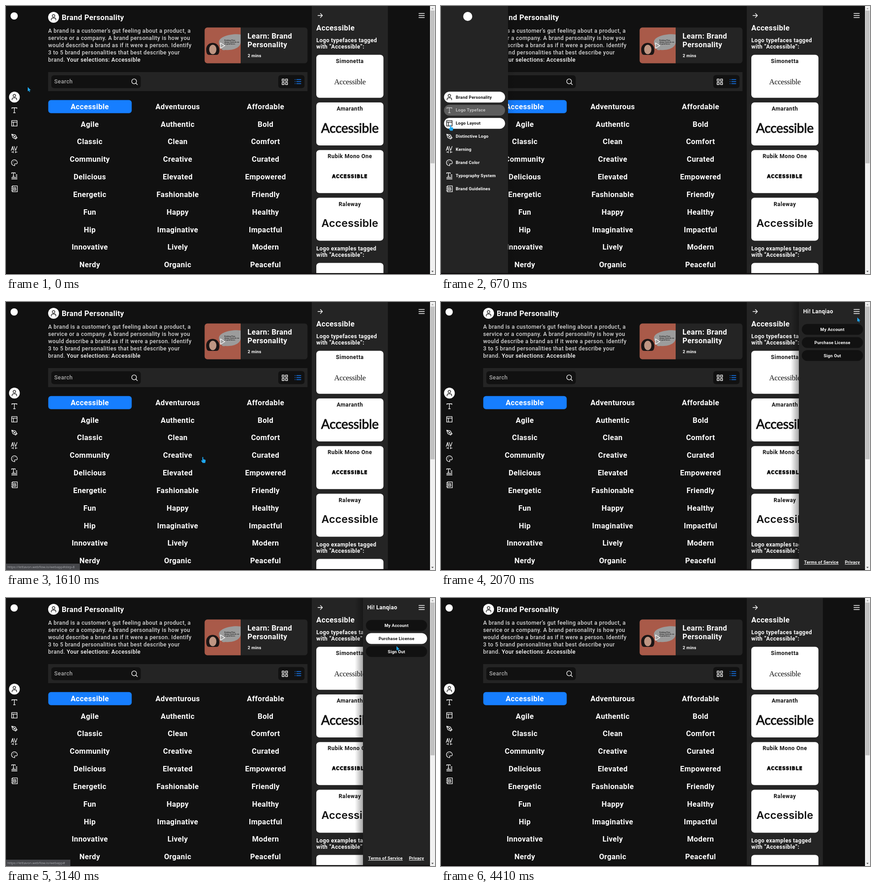
These frames come from a looping animation (947 px wide and 592 px high, 4480 ms). An HTML page:

```html
<!DOCTYPE html>
<html lang="en">
<head>
<meta charset="utf-8">
<title>Brand Personality</title>
<style>
html, body { margin: 0; width: 100%; height: 100%; overflow: hidden; background: #111; }
svg { display: block; width: 947px; height: 592px; }
text { font-family: Roboto, "Noto Sans", sans-serif; fill: #fff; white-space: pre; }
.big { font-size: 16.4px; font-weight: 700; letter-spacing: .4px; }
.mid { font-size: 12.3px; font-weight: 700; letter-spacing: .36px; }
.body { font-size: 12.4px; font-weight: 500; letter-spacing: .39px; fill: #d6d6d6; }
.small { font-size: 9.5px; font-weight: 700; letter-spacing: .22px; }
.tiny { font-size: 3.8px; font-weight: 700; fill: #222; }
.url { font: 7.4px "Open Sans", "Noto Sans", sans-serif; fill: #a9abb0; }
.c { text-anchor: middle; }
.dark { fill: #111; }
.line { fill: none; stroke: #fff; stroke-width: 1.3; stroke-linejoin: round; stroke-linecap: round; }
</style>
</head>
<body>
<svg id="stage" viewBox="0 0 947 592" xmlns="http://www.w3.org/2000/svg"></svg>
<script>
const LOOP = 4480, TICK = LOOP / 67;
const BLUE = '#167eff', PANEL = '#242424', BG = '#111';

const text = (x, y, s, cls, extra = '') => `<text x="${x}" y="${y}" class="${cls}" ${extra}>${s}</text>`;
const box = (x, y, w, h, fill, r = 0, extra = '') =>
  `<rect x="${x}" y="${y}" width="${w}" height="${h}" rx="${r}" fill="${fill}" ${extra}/>`;
const line = (d, extra = '') => `<path class="line" d="${d}" ${extra}/>`;
const lines = (x, y, step, rows, cls) => rows.map((s, i) => text(x, y + i * step, s, cls)).join('');

// Icons are drawn around 0,0
const USER = 'M-2.9-3.2a2.9 2.9 0 1 0 5.8 0a2.9 2.9 0 1 0-5.8 0M-5 6V4.5a3 3 0 0 1 3-3H2a3 3 0 0 1 3 3V6';
const NAV = [
  ['Brand Personality', USER],
  ['Logo Typeface', 'M-5.5-3.7V-5.5H5.5V-3.7M0-5.5V5.5M-2 5.5H2'],
  ['Logo Layout', 'M-6-6H6V6H-6ZM-6-2.5H6M-2-2.5V6'],
  ['Distinctive Logo', 'M-6-5L2-3.5L5 1.5L1 4.8L-3.5 2.5ZM-6-5L-.5-.3M-.5.5a1 1 0 1 0 2 0a1 1 0 1 0-2 0M2.2 6L6.3 2.5'],
  ['Kerning', 'M-7 2L-4-7L-1 2M-6-1H-2M-.5-7L2.8 2L6-7M-6 5.5H-2.5M2.5 5.5H6M-2.5 3.8V7.2M2.5 3.8V7.2'],
  ['Brand Color', 'M1 6.5A6.5 6.5 0 1 1 6.5 0C6.5 2 5 3 3 2.5C0 2 0 4 1 6.5ZM-3 .5h.1M-2.2-2.8h.1M1.5-3.5h.1'],
  ['Typography System', 'M-6-5V-6.5H2V-5M-2-6.5V1.5M-3.5 1.5H-.5M3.5-2H6M3.5 1H6M-6 4H6M-6 7H6'],
  ['Brand Guidelines', 'M-4.5-6.5H6.5V6.5H-4.5ZM-6.5-4h3M-6.5 0h3M-6.5 4h3M-1.3-3.5V3.5H1.5a1.8 1.8 0 0 0 0-3.6H-1.3M1.3-.1a1.7 1.7 0 0 0 0-3.4H-1.3']
];
const TRAITS = ('Accessible Adventurous Affordable Agile Authentic Bold Classic Clean Comfort Community ' +
  'Creative Curated Delicious Elevated Empowered Energetic Fashionable Friendly Fun Happy Healthy ' +
  'Hip Imaginative Impactful Innovative Lively Modern Nerdy Organic Peaceful').split(' ');
const CARDS = [
  ['Simonetta', 'Accessible', 172.5, "font:17px 'Liberation Serif',serif;letter-spacing:-.4px"],
  ['Amaranth', 'Accessible', 175, 'font:28.5px Lato,sans-serif;letter-spacing:-.3px;stroke:#111;stroke-width:.9px'],
  ['Rubik Mono One', 'ACCESSIBLE', 169.5, "font:700 10px 'DejaVu Sans',sans-serif;letter-spacing:1.1px;stroke:#111;stroke-width:.9px"],
  ['Raleway', 'Accessible', 172.5, 'font:600 23.5px Inter,sans-serif;letter-spacing:.1px']
];
const ACCOUNT = ['My Account', 'Purchase License', 'Sign Out'];
const navY = i => 201.3 + i * 28.95;
const pillY = i => 60.5 + i * 28.9;

const header =
  `<circle cx="105" cy="25" r="12" fill="#fff"/>` + line(USER, `transform="translate(105 25)" style="stroke:${BG}"`) +
  text(123, 30.5, 'Brand Personality', 'big') +
  lines(93, 59, 15.9, [
    'A brand is a customer’s gut feeling about a product, a',
    'service or a company. A brand personality is how you',
    'would describe a brand as if it were a person. Identify',
    '3 to 5 brand personalities that best describe your',
    'brand. <tspan fill="#fff">Your selections: Accessible</tspan>'
  ], 'body');

const lesson =
  box(438.5, 47.4, 227, 79, PANEL, 6) +
  `<path d="M518 47.400V126.400H444.500a6 6 0 0 1-6-6V53.400a6 6 0 0 1 6-6Z" fill="#a95a49"/>
   <path d="M471 90L478 97Q480 98 484 97C505 99 518 90 518 80V63C502 60 470 66 470 80Q470 86 474 89Z" fill="#9c9c9c"/>
   <path d="M442 98C440 76 472 76 471 98Q471 108 464 108H449Q442 108 442 98Z" fill="#1b1515"/>
   <ellipse cx="456.500" cy="96" rx="8" ry="10.500" fill="#bf9683"/>` +
  lines(482, 76.5, 4.3, ['Drinking Plem', 'always reminds me', 'of good times'], 'tiny') +
  line('M473.500 81.500L483 87.500L473.500 93.500Z') +
  lines(533, 72, 19, ['Learn: Brand', 'Personality'], 'big') +
  text(533.5, 113, '2 mins', 'small');

const tools =
  box(93, 146, 572.5, 42, PANEL) + box(100, 153, 197.5, 28.5, BG, 6) + box(601, 152.5, 58, 29, BG, 6) +
  text(106.5, 171.3, 'Search', 'body', 'style="fill:#aaa"') +
  line('M277.500 166.500a5.300 5.300 0 1 0 10.600 0a5.300 5.300 0 1 0-10.600 0M286.700 170.500L290 173.800') +
  line('M609.500 161.500h4.500v4.500h-4.500ZM617 161.500h4.500v4.500h-4.500ZM609.500 169h4.500v4.500h-4.500ZM617 169h4.500v4.500h-4.500Z') +
  line('M638 162.500h.5M641.500 162.500h9.500M638 167h.5M641.500 167h9.500M638 171.500h.5M641.500 171.500h9.500', `style="stroke:${BLUE}"`);

const traits = box(93.3, 207.8, 184.2, 29, BLUE, 6) + TRAITS.map((s, i) =>
  text(185 + i % 3 * 194, 227.8 + Math.floor(i / 3) * 38.83, s, 'big c')).join('');

const examples =
  box(675, 0, 168, 592, PANEL) + line('M688.500 21H698.500M694 16.500L698.500 21L694 25.500') +
  text(685, 54, 'Accessible', 'big') +
  lines(685, 79.5, 14, ['Logo typefaces tagged', 'with “Accessible”:'], 'mid') +
  CARDS.map(([name, word, y, style], i) => `<g transform="translate(0 ${i * 105.2})">` +
    box(685, 107.8, 148.2, 95, '#fff', 7) + text(759, 126, name, 'mid c dark', 'style="font-weight:600;letter-spacing:.5px"') +
    text(759, y, word, 'c dark', `style="${style}"`) + '</g>').join('') +
  lines(685, 539.5, 14, ['Logo examples tagged', 'with “Accessible”:'], 'mid') +
  box(685, 567.5, 148.2, 40, '#fff', 7);

const menu =
  `<g id="sheet">${box(0, 0, 37, 592, PANEL, 0, 'id="sheetBg"')}${box(0, 0, 18, 592, 'url(#fadeR)', 0, 'id="sheetShade"')}</g>` +
  `<circle id="mark" fill="#fff"/>` +
  NAV.map(([, d], i) => box(6.7, navY(i) - 12, 24, 24, '#fff', 12, 'class="navPill"') +
    line(d, `transform="translate(18.500 ${navY(i)})"  data-nav="${i}"`)).join('') +
  `<g id="labels" clip-path="url(#menuClip)">` +
  NAV.map(([s], i) => text(32.5, navY(i) + 3.2, s, 'small')).join('') + '</g>';

const account = `<g id="account">` + box(770, 0, 18, 592, 'url(#fadeL)') + box(788, 0, 148, 592, PANEL) +
  text(797.5, 25, 'Hi! Lanqiao', 'mid') +
  ACCOUNT.map((s, i) => box(794.5, pillY(i) - 12, 135, 24, BG, 12, 'class="accPill"') +
    text(862, pillY(i) + 3.2, s, 'small c accText')).join('') +
  text(799.5, 578, 'Terms of Service', 'small', 'text-decoration="underline"') +
  text(889.5, 578, 'Privacy', 'small', 'text-decoration="underline"') + '</g>';

const scrollbar = box(936, 0, 11, 592, '#f1f1f1') + box(937, 10, 9, 337.5, '#c1c1c1') +
  `<path d="M939 7L941.500 4L944 7Z" fill="#a3a3a3"/><path d="M939 585L941.500 588L944 585Z" fill="#505050"/>`;

const fade = (id, a, b, peak) => `<linearGradient id="${id}"><stop stop-opacity="${a * peak}"/><stop offset="1" stop-opacity="${b * peak}"/></linearGradient>`;

const stage = document.getElementById('stage');
stage.innerHTML =
  `<defs>${fade('fadeR', 1, 0, .1)}${fade('fadeL', 0, 1, .35)}<clipPath id="menuClip"><rect id="clipBox" height="592"/></clipPath></defs>` +
  box(0, 0, 947, 592, BG) + header + lesson + tools + traits + examples + menu + account +
  line('M911.500 16.500H923.500M911.500 21H923.500M911.500 25.500H923.500', 'style="stroke-width:1.6"') +
  box(0, 590, 936, 2, '#090607') + scrollbar +
  `<g id="status">${box(0, 578, 163, 14, '#45464a', 0, 'id="statusBg"')}${text(3, 588, '', 'url')}</g>` +
  `<g id="cursor" fill="#1ea7f0"><path id="arrow" d="M0 0V9.500L2.200 7.700L3.800 11L5.200 10.300L3.700 7.100H6.800Z"/>
   <path id="hand" d="M-1 .5Q0-.8 1 .5V4.800L5 5.800Q6.500 6.300 6.300 8L5.300 13H-.3L-3.500 8.500Q-3.500 7 -2 7.300L-1 8.300Z"/></g>`;

const $ = id => document.getElementById(id);
const all = q => [...stage.querySelectorAll(q)];
const set = (el, attrs) => { for (const k in attrs) el.setAttribute(k, attrs[k]); };
const show = (el, on) => { el.style.display = on ? '' : 'none'; };
const clamp = v => Math.min(1, Math.max(0, v));
const navPills = all('.navPill'), navIcons = all('[data-nav]'), labels = all('#labels text');
const accPills = all('.accPill'), accTexts = all('.accText'), urlText = all('.url')[0];

// The CSS "ease" curve, solved by bisection
function ease(p) {
  p = clamp(p);
  if (p === 0 || p === 1) return p;
  let lo = 0, hi = 1, u;
  for (let i = 0; i < 20; i++) {
    u = (lo + hi) / 2;
    const x = .75 * u * (1 - u) + u ** 3;
    if (x < p) lo = u; else hi = u;
  }
  return .3 * u * (1 - u) ** 2 + 3 * u * u * (1 - u) + u ** 3;
}
const opened = (t, from, to) => ease((t - from) / 200) - ease((t - to) / 200);

// Quick rise while hovered, then an exponential trail
const hover = (t, from, to) => t < from ? 0 : t <= to ? clamp((t - from) / 50) : Math.exp((to - t) / 47);
const gray = v => `rgb(${v},${v},${v})`;
const mix = (a, b, k) => gray(Math.round(a + (b - a) * k));

const PATH = [
  [0, 48, 179], [70, 40, 179], [140, 22, 180], [200, 13, 181], [400, 16, 198], [540, 18, 222],
  [740, 22, 285], [940, 27, 384], [1000, 28, 403], [1140, 28, 403], [1270, 150, 390], [1420, 330, 362],
  [1600, 434, 343], [1670, 440, 335], [1780, 660, 190], [1900, 890, 48], [2070, 919, 34], [2210, 916, 36],
  [2400, 880, 49], [2540, 866, 58], [2680, 861, 60], [2810, 861, 82], [3080, 861, 82], [3140, 862, 106],
  [3270, 862, 113], [3410, 862, 119], [4140, 862, 119], [4340, 880, -20]
];
const HANDS = [[530, 1700], [2480, 3100], [3190, 4200]];
const URLS = [[1065, 1800, '#step-8', 163], [2540, 4300, '#', 142]];
const ACC_HOVER = [[2480, 2740], [2740, 3180], [3180, 4200]];
const during = (t, rows) => rows.find(r => t >= r[0] && t < r[1]);

function cursorAt(t) {
  const i = PATH.findIndex(p => p[0] > t);
  if (i < 0) return PATH[PATH.length - 1].slice(1);
  const [t0, x0, y0] = PATH[i - 1], [t1, x1, y1] = PATH[i], k = (t - t0) / (t1 - t0);
  return [x0 + (x1 - x0) * k, y0 + (y1 - y0) * k];
}

function draw(t) {
  const k = opened(t, 60, 1270), w = 37 + 111 * k;
  set($('sheet'), { opacity: clamp(k * 3) });
  set($('sheetBg'), { width: w });
  set($('sheetShade'), { x: w });
  set($('clipBox'), { width: Math.max(0, w - 9) });
  set($('labels'), { opacity: k });
  set($('mark'), k > .1 ? { cx: 59, cy: 23, r: 10 } : { cx: 18, cy: 22, r: 8 });
  NAV.forEach((_, i) => {
    const from = 475 + i * 65;
    const a = i ? hover(t, from, i === 7 ? 1270 : from + 65) : 1;
    const ink = mix(255, 17, a);
    set(navPills[i], { width: w - 13.3, opacity: a });
    navIcons[i].style.stroke = labels[i].style.fill = ink;
  });

  const side = opened(t, 1903, 4190);
  show($('account'), side > 0);
  set($('account'), { transform: `translate(${148 * (1 - side)} 0)` });
  ACC_HOVER.forEach(([from, to], i) => {
    const a = hover(t, from, to);
    accPills[i].style.fill = mix(17, 255, a);
    accTexts[i].style.fill = mix(255, 17, a);
  });

  const link = during(t, URLS);
  show($('status'), link);
  if (link) {
    urlText.textContent = 'https://lettavon.webflow.io/webapp' + link[2];
    set($('statusBg'), { width: link[3] });
  }

  const [x, y] = cursorAt(t), hand = during(t, HANDS);
  set($('cursor'), { transform: `translate(${x} ${y})` });
  show($('hand'), hand);
  show($('arrow'), !hand);
}

const start = performance.now();
function frame() {
  const t = (performance.now() - start) % LOOP;
  draw(Math.min(66, Math.floor((t + 5) / TICK)) * TICK);
  requestAnimationFrame(frame);
}
frame();
</script>
</body>
</html>
```
